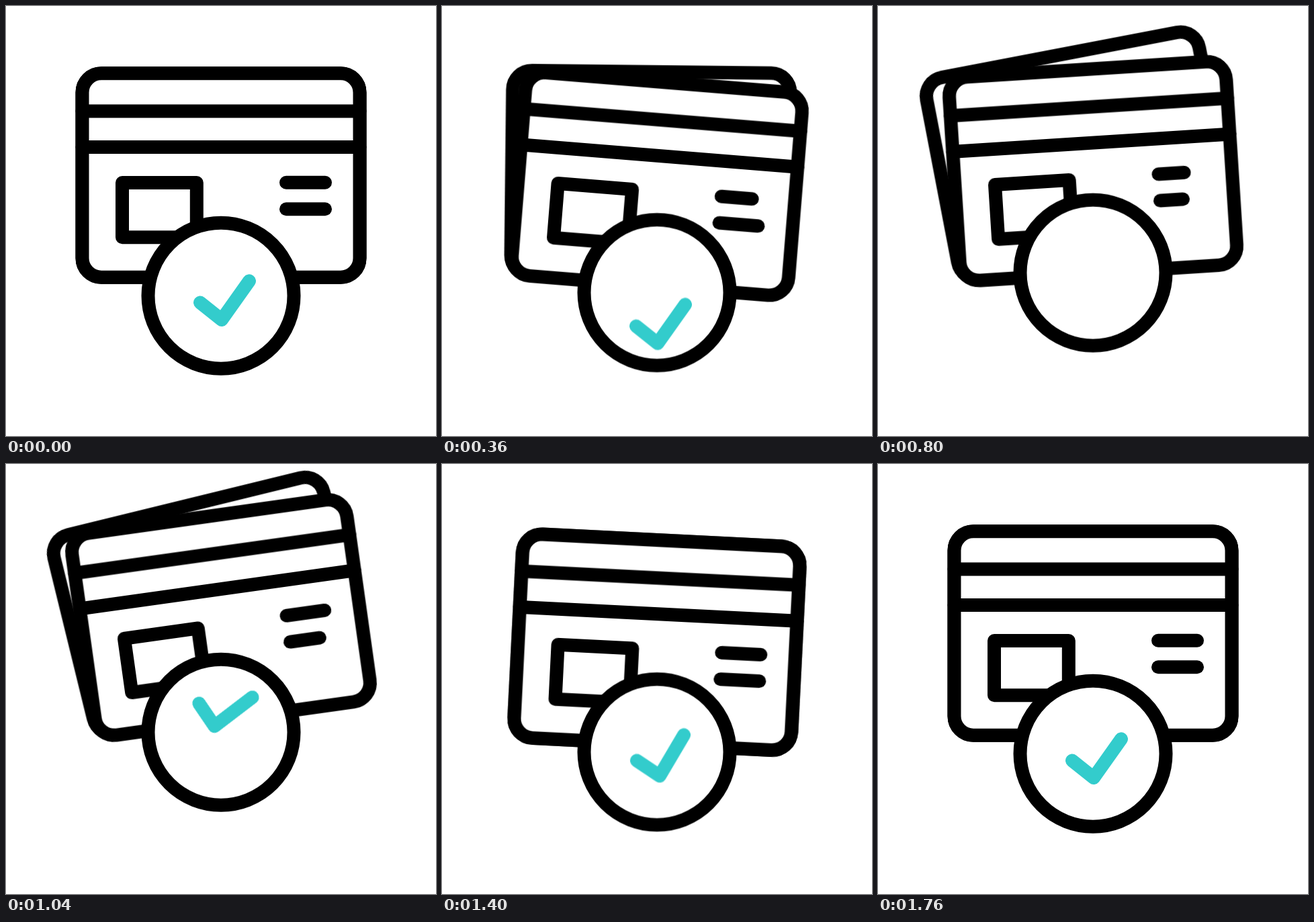
These frames come from a looping animation (640 px wide and 640 px high, 2.08 s). An HTML page without scripts:

```html
<!DOCTYPE html>
<html lang="en">
<head>
<meta charset="utf-8">
<title>Card approved</title>
<style>
  html, body { margin: 0; width: 100%; height: 100%; overflow: hidden; background: #fff; }
  svg { display: block; width: 100vw; height: 100vh; }

  .ink { fill: #fff; stroke: #000; stroke-width: 20; stroke-linecap: round; stroke-linejoin: round; }
  .tick { fill: none; stroke: #3cc; stroke-width: 20; stroke-linecap: round; stroke-linejoin: round; }

  .bob, .tilt, .rear, .badge, .drop, .twist, .text {
    animation: 2080ms cubic-bezier(.37, 0, .63, 1) infinite;
  }
  .bob { animation-name: bob; }
  .tilt { animation-name: tilt; transform-origin: 320px 252px; }
  .rear { animation-name: fan; transform-origin: 110px 398px; }
  .badge { animation-name: lift; }
  .drop { animation-name: drop; }
  .twist { animation-name: twist; transform-origin: 320px 431.2px; }
  .text { stroke-dasharray: 58 200; }
  .upper { animation-name: shrink-upper; }
  .lower { animation-name: shrink-lower; }

  @keyframes bob {
    0%, 12.5% { transform: translateY(0); }
    30.8% { transform: translateY(6.2px); }
    50% { transform: translateY(-3.1px); }
    67.3% { transform: translateY(5.8px); }
    84.6%, 100% { transform: translateY(0); }
  }
  @keyframes tilt {
    0%, 3.85% { transform: translateY(0) rotate(0deg); }
    23.1%, 27.4% { transform: translateY(14.9px) rotate(5.8deg); }
    45.4%, 49% { transform: translateY(-20.6px) rotate(-8.05deg); }
    68.3% { transform: translateY(7.6px) rotate(2.95deg); }
    84.6%, 100% { transform: translateY(0) rotate(0deg); }
  }
  @keyframes fan {
    0%, 3.85% { transform: rotate(0deg); }
    30.8% { transform: rotate(-8deg); animation-timing-function: linear; }
    38.5% { transform: rotate(-7.2deg); animation-timing-function: linear; }
    50% { transform: rotate(-5.8deg); animation-timing-function: cubic-bezier(.3, .15, .6, 1); }
    67.3%, 100% { transform: rotate(0deg); }
  }
  @keyframes lift {
    0%, 11.1% { transform: translateY(0); }
    37%, 45.7% { transform: translateY(-34.2px); }
    72.1%, 100% { transform: translateY(0); }
  }
  /* The tick leaves through the bottom and returns from the top. */
  @keyframes drop {
    0%, 9.6% { transform: translateY(0); }
    30.8% { transform: translateY(135px); }
    30.81%, 37% { transform: translateY(-150px); }
    57.5%, 100% { transform: translateY(0); }
  }
  @keyframes twist {
    0%, 30.8% { transform: rotate(0deg); }
    30.81%, 48.6% { transform: rotate(17.6deg); }
    67.3% { transform: rotate(-4.8deg); }
    84.6%, 100% { transform: rotate(0deg); }
  }
  @keyframes shrink-upper {
    0%, 3.85% { stroke-dashoffset: 0; }
    30.8%, 33.2% { stroke-dashoffset: 24px; }
    52.4%, 100% { stroke-dashoffset: 0; }
  }
  @keyframes shrink-lower {
    0%, 16.8% { stroke-dashoffset: 0; }
    35.1%, 41.3% { stroke-dashoffset: 24px; }
    60.6%, 100% { stroke-dashoffset: 0; }
  }
</style>
</head>
<body>
<svg viewBox="0 0 640 640">
  <defs>
    <rect id="card" x="113.5" y="100.3" width="413" height="303.4" rx="28.5"/>
    <clipPath id="inside"><circle cx="320" cy="431.2" r="105"/></clipPath>
  </defs>

  <g class="bob">
    <g class="tilt ink">
      <use class="rear" href="#card"/>
      <use href="#card"/>
      <path d="M113.5 156.5H526.5M113.5 210H526.5"/>
      <rect x="173" y="263" width="110.8" height="81.3"/>
      <path class="text upper" d="M417 262.8h58"/>
      <path class="text lower" d="M417 302.3h58"/>
    </g>
  </g>

  <g class="badge">
    <circle cx="320" cy="431.2" r="108" fill="#fff"/>
    <g clip-path="url(#inside)">
      <g class="drop">
        <path class="twist tick" d="M289 441.5L321 467L362 409.3"/>
      </g>
    </g>
    <circle class="ink" cx="320" cy="431.2" r="108.5" style="fill: none"/>
  </g>
</svg>
</body>
</html>
```
